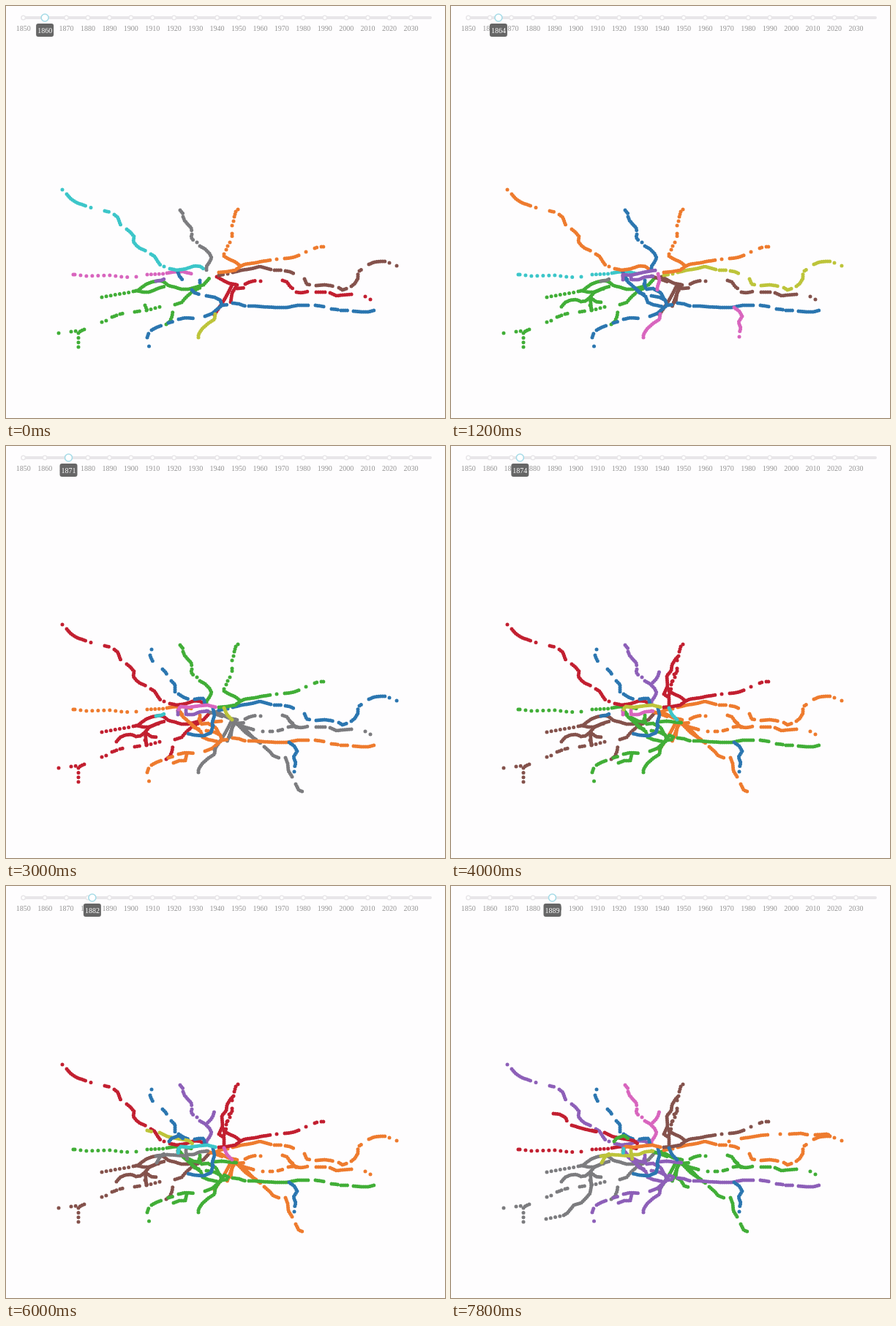
An HTML page for the animation above (8 s loop, 600 px wide and 563 px high).

```html
<!DOCTYPE html>
<html lang="en">
<head>
<meta charset="utf-8">
<title>Network growth by year</title>
<style>
  html, body { margin: 0; width: 100%; height: 100%; overflow: hidden; background: #fefdfe; }
  svg { display: block; width: 600px; height: 563px; }
  text { font: 10px "Liberation Serif", serif; text-anchor: middle; fill: #949494; }
  #map path { fill: none; stroke-width: 5; stroke-linecap: round; stroke-linejoin: round; }
  #tip text { fill: #fff; }
</style>
</head>
<body>
<svg viewBox="0 0 600 563">
  <g id="map"></g>
  <g id="slider"><rect x="21" y="14" width="561" height="4" rx="2" fill="#e8e6e9"/></g>
  <g id="tip">
    <circle cy="16" r="5" fill="#fff" stroke="#a6dbe7" stroke-width="1.6"/>
    <rect x="-12" y="24" width="24" height="18" rx="3" fill="#666"/>
    <text y="37">1860</text>
  </g>
</svg>
<script>
const STEP = 200, STEPS = 40, YEARS_PER_STEP = 0.745;
const PHASE_STARTS = [0, 4, 12, 17, 26, 33];
const SHIFT_STEP = 12;
const COLORS = {
  b: '#2b76b0', o: '#ee7b2e', g: '#41ae37', r: '#c21f30', p: '#8d5fb8',
  n: '#84524c', k: '#d865be', x: '#7c7c7f', y: '#bdc43a', c: '#3cc6c9'
};

// Each line: one colour letter per phase, first step shown, dot spacing, path.
const LINES = [
  // west
  ['kcoggr', 0, 8, 'M94,367L110,369L142,368L158,370L171,371M178,370h.1'],
  ['kcoggr', 0, 5.4, 'M92,367h.1M193,367L217,366'],
  ['kcoggr', 0, 2.8, 'M220,365L232,363L242,363L254,366'],
  ['ggrnnx', 0, 6.2, 'M131,398L147,395L171,391M72,447h.1M99,466L99,449M89,445L98,444M131,432L137,430M192,416L215,410'],
  ['ggrnnx', 0, 2.8, 'M174,390L180,389L186,384L192,380L200,377L210,375L216,377L222,382L230,384L240,387L250,387L260,384L270,381L278,372M178,389L188,391L195,391L203,388L210,385L218,383'],
  ['ggrnnx', 0, 3.2, 'M99,447L102,444L109,441M145,425L153,422M156,421L161,420M176,418L183,417M231,408L240,405L247,397L255,390L265,385M190,409L193,416M219,435L224,431L227,424L228,417'],
  ['ggrnnx', 4, 2.8, 'M151,411L156,405L163,402L171,401L178,404L184,403L190,398L196,391L205,387L210,386M190,398L191,406L192,416M190,398L198,404L207,405'],
  ['xxxxxx', 36, 6.4, 'M130,462L150,458'],
  ['xxxxxx', 36, 2.8, 'M154,457L159,454L163,449L168,443L178,440L184,434L190,427L192,416'],
  ['pxcbxy', 0, 2.8, 'M205,376L212,375L218,372'],

  // east
  ['rnxoog', 0, 2.8, 'M288,370L297,375L305,379L316,381L309,392L307,405M309,381L304,391L298,402L290,414L284,423M316,386L327,385M327,380L333,377L342,375M348,376L350,376'],
  ['rnxoog', 0, 3, 'M378,375L384,377L388,383L393,387M397,391L404,392L413,390M424,391L438,391M443,392L452,396L460,395L473,394M491,397L494,397M498,401h.1'],
  ['rnxoog', 4, 2.8, 'M274,369L285,373L297,377M313,381L307,398L302,411'],
  ['rnxoog', 9, 2.9, 'M316,387L326,391L340,395M317,388L328,399L343,409M351,397h.1M361,397L365,397M372,396L380,394M386,391L393,390L400,391M388,383L397,392'],
  ['xxxoog', 12, 2.8, 'M325,392L340,408L348,413M353,418L361,425L365,430L375,434M382,433L385,441L386,451L391,459M396,469L400,477L407,480'],
  ['gggggg', 36, 2.8, 'M307,405L314,409L319,417L326,419'],
  ['nybooo', 0, 2.8, 'M291,368L297,367M303,366L305,366M310,364L322,361L335,359L347,356L355,358L362,360M367,361L376,361M382,362L388,363L394,366M408,373L411,380L416,381M424,382L435,381L443,382L448,383M455,385L460,388L466,386M472,383L477,379L481,372L481,366M483,362L486,360M496,353L503,350L511,349L518,349M524,351h.1M534,355h.1'],
  ['oooooo', 36, 3, 'M380,356h.1M397,352L410,350L422,348L434,347M450,346L452,346M463,346L478,345L488,347M498,347L515,346L518,349'],

  // south and centre
  ['bboggp', 0, 2.8, 'M195.5,465h.1M193,453L195,447M199,443L206,439L214,436M222,433L229,431M236,428L245,426L258,427M272,424L282,420L289,414L295,409'],
  ['bboggp', 0, 2.8, 'M235,364L237,369L241,374M254,388L258,392L264,394M274,396L285,398L293,402L295,409M265,375L265,380'],
  ['bboggp', 4, 2.8, 'M235,369L242,377L250,384L258,391L266,397L269,405L276,408L290,411M264,380L267,387L276,386L287,392L292,402'],
  ['bboggp', 9, 2.8, 'M229,440L237,437L245,437L247,428M283,384L295,383'],
  ['ggoggp', 18, 2.8, 'M246,378L256,383L267,385M295,383L304,384L315,385M286,420L290,414L298,402L306,406'],
  ['bboggp', 0, 2.8, 'M296,409L303,408M310,406L318,407L327,410M332,410L340,410L352,411L370,412L384,412L398,409L414,409M423,409L430,410L435,411M445,414L454,415M458,416L468,416M475,417L485,418L495,418L503,416'],

  // north
  ['corrrp', 0, 2.8, 'M77,251h.1M83,257L88,263L97,269L106,272L111,274M116,275.5h.1M135,280L143,282M148,285L153,289L155,295L157,300M165,305L170,309L175,315L174,322L178,327L183,331L192,335M198,339L203,342L208,350L211,354M216,356h.1M224,359L234,361L246,359L258,355L266,356L271,360'],
  ['xbgppk', 0, 2.8, 'M238,279L242,284M242,288L244,293L249,299L253,303L254,308M254,312L253,316L256,320M261,323h.1M265,328L272,332L278,338L281,344L278,350L274,356L274,361'],
  ['oogrrn', 0, 3.6, 'M317,278h.1M314,281L312,288M311,294h.1M309,300L311,300M309,311L309,318M306,323h.1M303,328h.1M301,333h.1'],
  ['oogrrn', 0, 2.8, 'M298,339L298,342L305,346L314,350L320,355M291,364L302,363L313,361L320,356L326,353L340,351L350,349L363,347M370,346L372,346M381,345L390,344L397,342L402,340M410,336h.1M422,331L425,330M431,329L435,329'],
  ['bbbbbb', 12, 2.8, 'M199,285h.1M197,293L198,296L201,302M214,312L219,317L220,321M226,328L231,333L231,343M236,346L242,350L250,353M258,353L264,352L270,352L272,360'],
  ['rrrrrn', 18, 2.8, 'M298,362L298,351L291,346L296,335L295,321L301,314L302,306L307,298L310,295M298,347L301,338M302,329h.1M305,319L308,317'],
  ['pppppk', 18, 2.8, 'M274,332L280,326L283,321L285,314'],
  ['yyyyyr', 26, 2.8, 'M193,341L200,343M210,344L220,349L233,352L250,355L256,360'],
  ['rrrrrr', 36, 2.8, 'M140,318L149,319L157,324L159,330M165,334L175,337L186,340L200,343'],

  // inner links
  ['ykxggp', 0, 2.8, 'M263,453L263,449L268,441L276,434L285,428L286,420'],
  ['kkbbbb', 4, 2.8, 'M387,412L394,417L398,424L393,432L396,440L394,447M394,452h.1'],
  ['kkbbbb', 4, 2.8, 'M283,366L285,375L282,384L282,389'],
  ['pppkxy', 4, 2.8, 'M235,374L235,367M246,368L246,374L256,374L266,370L278,369'],
  ['pp    ', 4, 2.8, 'M235,367L246,368L258,365L268,363L280,361'],
  ['kkkyco', 12, 2.8, 'M236,367L238,363L250,364L264,362L275,361L287,364'],
  ['bbbbbb', 12, 2.8, 'M283,389L280,399L270,403L258,402L248,400'],
  ['yyyckb', 12, 2.8, 'M298,365L302,374L309,381'],
  ['bbbbbg', 26, 2.8, 'M223,356L226,352L236,348L242,352'],
  ['xxxxxy', 26, 2.8, 'M206,385L211,376L220,374L235,375L247,376L248,382'],
  ['cccccc', 26, 2.8, 'M236,366L235,374']
];

const svgNode = (tag, attrs, parent) => {
  const node = document.createElementNS('http://www.w3.org/2000/svg', tag);
  for (const key in attrs) node.setAttribute(key, attrs[key]);
  return parent.appendChild(node);
};
const yearX = year => 23.7 + (year - 1850) * 2.943;

const map = document.getElementById('map');
const slider = document.getElementById('slider');
const tip = document.getElementById('tip');
const tipText = tip.querySelector('text');

const tracks = LINES.map(([colors, from, gap, d]) => ({
  colors, from, node: svgNode('path', { d, 'stroke-dasharray': `0 ${gap}` }, map)
}));

for (let year = 1850; year <= 2030; year += 10) {
  svgNode('circle', { cx: yearX(year), cy: 16, r: 2.8, fill: '#fff', stroke: '#e8e6e9', 'stroke-width': 1.5 }, slider);
  svgNode('text', { x: yearX(year), y: 34 }, slider).textContent = year;
}

function show(step) {
  const year = 1860 + Math.floor(step * YEARS_PER_STEP);
  const phase = PHASE_STARTS.filter(start => start <= step).length - 1;
  tip.setAttribute('transform', `translate(${yearX(year)})`);
  tipText.textContent = year;
  map.setAttribute('transform', `translate(0 ${step < SHIFT_STEP ? 0 : -7})`);
  for (const { colors, from, node } of tracks) {
    node.setAttribute('stroke', step >= from && COLORS[colors[phase]] || 'none');
  }
}

const start = performance.now();
let shown = -1;
function tick() {
  const step = Math.floor((performance.now() - start) / STEP) % STEPS;
  if (step !== shown) show(shown = step);
  requestAnimationFrame(tick);
}
tick();
</script>
</body>
</html>
```
